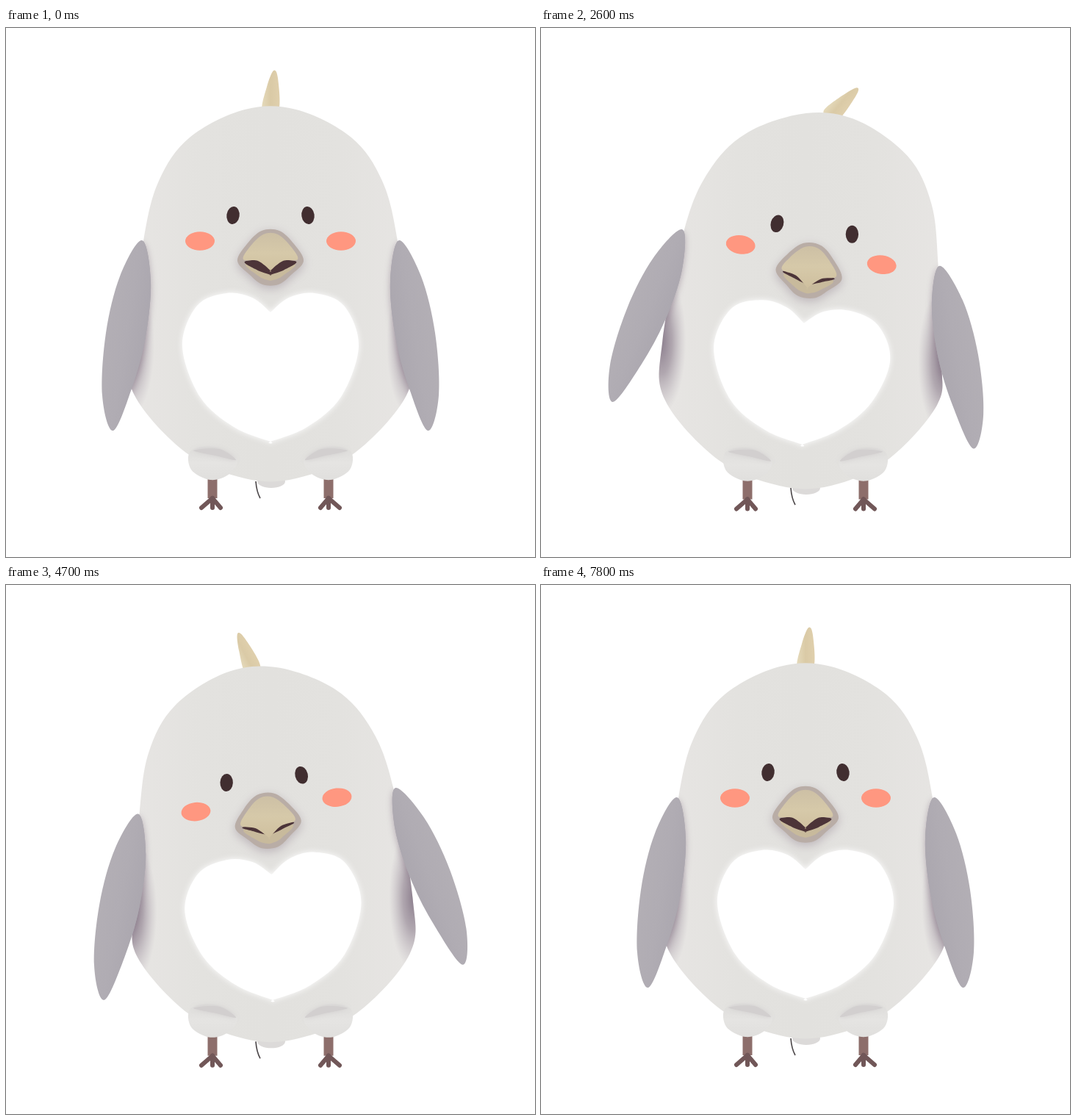
Recreate the animation shown at these times as an HTML page with a canvas. Size 720 by 720 pixels, loop 7900 ms.

```html
<!DOCTYPE html>
<html lang="en">
<head>
<meta charset="utf-8">
<title>Swaying bird</title>
<style>
html, body { margin: 0; height: 100%; overflow: hidden; background: #fff; }
canvas { display: block; width: 100vw; height: 100vh; }
</style>
</head>
<body>
<canvas id="stage" width="720" height="720"></canvas>
<script>
const ctx = document.getElementById('stage').getContext('2d');
const LOOP = 7900, SWAY = 7800, STEP = 100, TAU = Math.PI * 2, DEG = Math.PI / 180;
const TOP = 106, GROUND = 618, MIDDLE = 360;

// Key points of left halves; an end on the middle line becomes a corner.
const BODY = [[325, 111], [250, 149], [208, 208], [187, 290], [170, 430], [175, 500], [245, 578], [325, 613]];
const HEART = [[360, 387], [335, 367], [300, 361], [260, 378], [240, 433], [264, 502], [310, 543], [360, 563]];
const BEAK = [[348, 276], [328, 294], [315, 317], [332, 336], [349, 349]];
const LIP = [[328, 320], [343, 337], [356, 343]];

const WING = spline([[185, 289], [197, 345], [190, 420], [172, 488], [146, 548], [131, 500], [136, 415], [155, 338]]);
const CREST = spline([[349, 112], [355, 80], [364, 58], [370, 68], [371, 112]]);
const THIGH = spline([[251, 576], [252, 601], [278, 615], [304, 607], [314, 586], [282, 570]]);
const FOLD = spline([[255, 575], [290, 573], [313, 588], [285, 582]]);

let lean, sink;

function spline(pts) {
  const n = pts.length, path = new Path2D();
  const slope = (i, k) => (pts[(i + 1) % n][k] - pts[(i + n - 1) % n][k]) / 6;
  path.moveTo(...pts[0]);
  pts.forEach(([x, y], i) => {
    const j = (i + 1) % n, [u, v] = pts[j];
    path.bezierCurveTo(x + slope(i, 0), y + slope(i, 1), u - slope(j, 0), v - slope(j, 1), u, v);
  });
  return path;
}

function outline(half, warp) {
  const mirrored = half.map(([x, y]) => [2 * MIDDLE - x, y]).reverse();
  return spline([...half, ...mirrored].map(warp));
}

function ease(u) {
  u = Math.max(0, Math.min(1, u));
  return u * u * (3 - 2 * u);
}

// The head turns fully, the belly less and less towards the ground.
const pitch = y => ease((562 - y) / 262);

function shift(y) {
  const u = Math.max(0, (GROUND - y) / (GROUND - TOP));
  return 35 * u ** 2.5 - 50 * u * (1 - u) ** 2;
}

const bend = drop => ([x, y]) => [
  x + lean * shift(y),
  y + sink * drop(y) + lean * .135 * pitch(y) * (x - MIDDLE)
];
const bodyBend = bend(() => 10);
const faceBend = bend(y => 4 + 14.5 * pitch(y));

function fill(path, color) {
  ctx.fillStyle = color;
  ctx.fill(path);
}

function line(x0, y0, x1, y1, width, color) {
  ctx.lineWidth = width;
  ctx.strokeStyle = color;
  ctx.beginPath();
  ctx.moveTo(x0, y0);
  ctx.lineTo(x1, y1);
  ctx.stroke();
}

function group(draw) {
  ctx.save();
  draw();
  ctx.restore();
}

function bothSides(draw) {
  for (const side of [1, -1]) group(() => draw(side));
}

function mirror(side) {
  if (side > 0) return;
  ctx.translate(2 * MIDDLE, 0);
  ctx.scale(-1, 1);
}

function shadow(color, blur, y = 0) {
  ctx.shadowColor = color;
  ctx.shadowBlur = blur;
  ctx.shadowOffsetY = y;
}

function gradient(x0, y0, x1, y1, ...colors) {
  const g = ctx.createLinearGradient(x0, y0, x1, y1);
  colors.forEach((c, i) => g.addColorStop(i / (colors.length - 1), c));
  return g;
}

function oval(x, y, rx, ry, tilt, color) {
  const path = new Path2D();
  path.ellipse(...faceBend([x, y]), rx, ry, tilt + lean * .135, 0, TAU);
  fill(path, color);
}

function drawCrest() {
  ctx.translate(...bodyBend([MIDDLE, TOP]));
  ctx.rotate(37 * lean * DEG);
  ctx.translate(-MIDDLE, -TOP);
  fill(CREST, gradient(349, 80, 371, 80, '#e4d9ba', '#dacaa6', '#dfcfac'));
}

function drawTail() {
  ctx.translate(0, 9 * sink);
  const tuft = new Path2D();
  tuft.ellipse(361, 617, 19, 9, 0, 0, TAU);
  fill(tuft, '#dcdad9');
  ctx.strokeStyle = '#4a4547';
  ctx.lineWidth = 1.6;
  ctx.stroke(new Path2D('M340 617Q341 631 346 640'));
}

function drawLeg(side) {
  mirror(side);
  ctx.translate(0, 1.5 * sink);
  line(281, 610, 281, 640, 13, '#8d6e6b');
  ctx.lineCap = 'round';
  for (const spread of [-15, 0, 11]) line(281, 640, 281 + spread, 653, 6, '#715758');
  fill(THIGH, gradient(0, 570, 0, 615, '#dedddb', '#e5e4e2', '#e0dfdd'));
  shadow('#d2cfcf', 6);
  fill(FOLD, '#d2cfcf');
}

// Dark flank that shows where a wing stands off the body.
function drawFlank(side, body) {
  ctx.clip(body);
  ctx.translate(...bodyBend([MIDDLE - 192 * side, 430]));
  ctx.scale(34, 100);
  const g = ctx.createRadialGradient(0, 0, 0, 0, 0, 1);
  g.addColorStop(0, 'rgba(128,113,130,.9)');
  g.addColorStop(.45, 'rgba(140,126,141,.6)');
  g.addColorStop(1, 'rgba(170,160,172,0)');
  ctx.fillStyle = g;
  ctx.fillRect(-1, -1, 2, 2);
}

function drawWing(side, flap, body) {
  const tip = side * lean;
  const place = () => {
    mirror(side);
    ctx.translate(185 + 7 * tip, 289 + 10 * sink - 23.5 * tip);
    ctx.rotate((7.1 * tip + flap) * DEG);
    ctx.scale(1, 1 - .035 * sink);
    ctx.translate(-185, -289);
  };
  group(() => {
    ctx.clip(body);
    place();
    shadow('rgba(125,108,125,.5)', 10, 3);
    fill(WING, '#aaa5ad');
  });
  place();
  fill(WING, gradient(130, 420, 197, 430, '#b3afb5', '#b0acb3', '#aaa6ae'));
}

function drawBeak() {
  const shut = ease(1.8 * sink);
  const upper = [[350, 281], [331, 299], [323, 315], [343, 317 + 4 * shut], [360, 330 + 6 * shut]];
  const mouth = [[327, 317], [341, 329 - 4 * shut], [360, 336 - 4 * shut]];
  const top = faceBend([MIDDLE, 279])[1];
  group(() => {
    shadow('rgba(150,136,148,.5)', 14, 4);
    fill(outline(BEAK, faceBend), '#b9ada6');
  });
  fill(outline(LIP, faceBend), '#c8ba9c');
  fill(outline(mouth, faceBend), '#4c3438');
  fill(outline(upper, faceBend), gradient(0, top, 0, top + 55, '#cdc0a5', '#d6c9a9', '#cfc09f'));
}

function draw(time) {
  const t = Math.floor(time % LOOP / STEP) * STEP;
  const a = TAU * t / SWAY;
  lean = 1.155 * (Math.sin(a) - .05 * Math.sin(2 * a));
  sink = Math.sin(a) ** 2 / .75;
  const beat = Math.sin(2 * a) ** 2;

  ctx.fillStyle = '#fff';
  ctx.fillRect(0, 0, 720, 720);
  group(drawCrest);
  group(drawTail);
  const body = outline(BODY, bodyBend);
  fill(body, gradient(170, 0, 550, 0, '#e7e5e3', '#e3e2df', '#e2e1de', '#e3e2df', '#e7e5e3'));
  bothSides(side => drawFlank(side, body));
  bothSides(drawLeg);
  group(() => {
    shadow('#fff', 9);
    fill(outline(HEART, faceBend), '#fff');
  });
  // The left wing beats evenly, the right one swells and fades over the loop.
  const reach = side => side > 0 ? 7.5 : 7.2 + 5 * Math.cos(a - 130 * DEG);
  bothSides(side => drawWing(side, reach(side) * beat, body));
  bothSides(side => {
    oval(MIDDLE - 51 * side, 255, 8.7, 12, .14 * side, '#412e30');
    oval(MIDDLE - 96 * side, 290, 20, 12.7, 0, '#ff9780');
  });
  drawBeak();
}

const start = performance.now();
function tick() {
  draw(performance.now() - start);
  requestAnimationFrame(tick);
}
tick();
</script>
</body>
</html>
```
